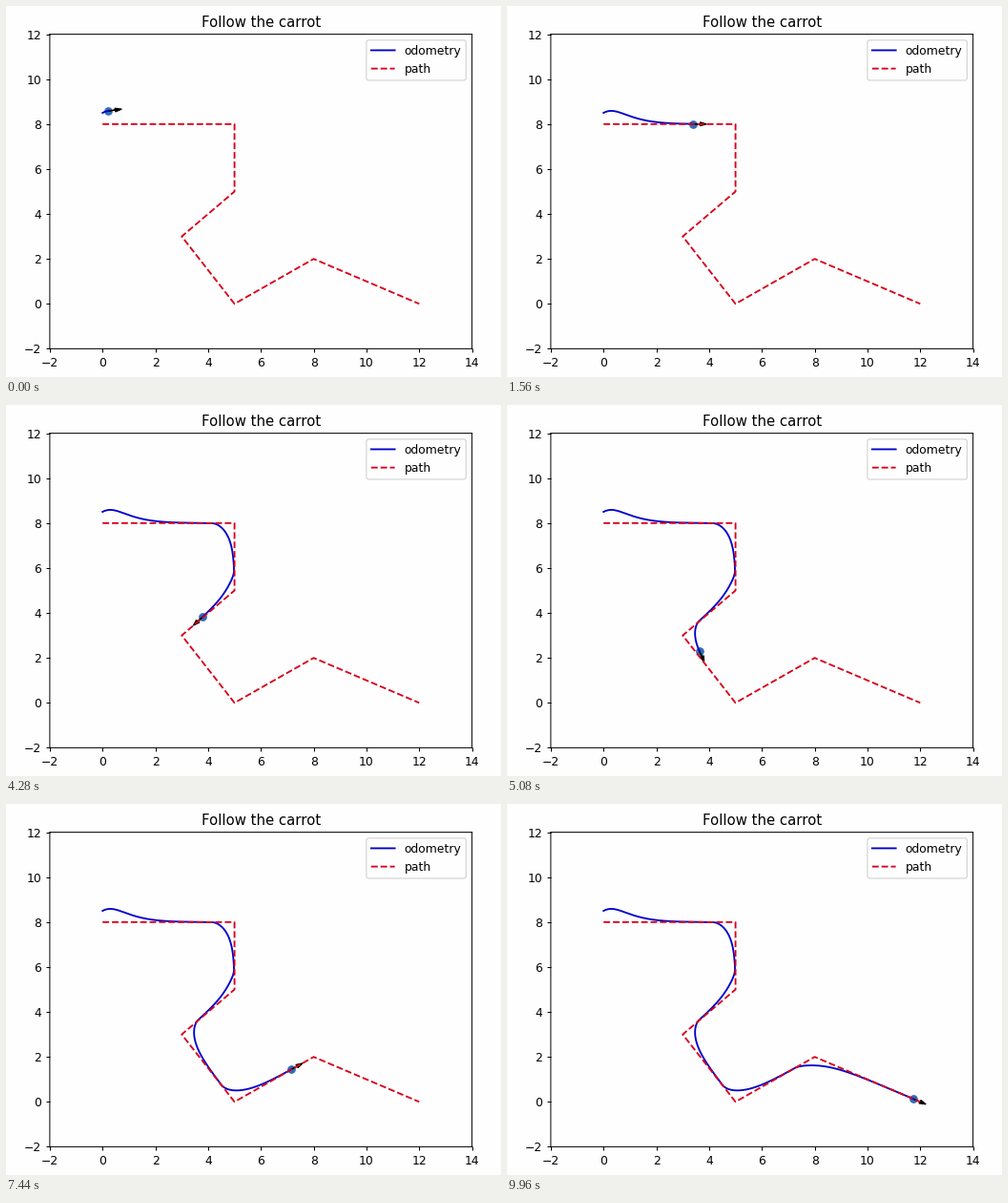
A matplotlib script for the animation above (10000 ms loop, 519 by 389 pixels).

```python
import math
import numpy as np
import matplotlib.pyplot as plt
from matplotlib.animation import FuncAnimation

W, H, DPI = 519, 389, 89.3
FRAMES, INTERVAL = 250, 40
LEFT, RIGHT, TOP, BOTTOM = 45.9, 488.6, 29.6, 359.4
BLUE, RED, DISC, PAPER = "#0000cc", "#d9001b", "#2f6dbb", "#fefefe"

PATH = np.array([(0, 8), (5, 8), (5, 5), (3, 3), (5, 0), (8, 2), (12, 0)],
                float)
LOOKAHEAD = 1.0     # carrot distance along the path
REACH = 0.92        # distance to a corner at which the next leg is taken
GOAL = 0.29         # distance to the last point at which the run ends
GAIN, MAX_TURN = 3.7, 1.9   # steering, radians per unit travelled
DS = 0.01
HEAD_START = 0.23   # distance already travelled at the first frame
SLOWDOWN = 0.038


def carrot(pos, start, end):
    leg = end - start
    size = math.hypot(*leg)
    along = max(0, (pos - start) @ leg / size)
    return start + leg * min(along + LOOKAHEAD, size) / size


def drive():
    """Steer towards the carrot; return positions and headings every DS."""
    pos, heading, leg = np.array([0, 8.5]), 0.6, 0
    last = len(PATH) - 2
    spots, headings = [pos], [heading]
    while math.dist(pos, PATH[-1]) > GOAL and len(spots) < 4000:
        if leg < last and math.dist(pos, PATH[leg + 1]) < REACH:
            leg += 1
        dx, dy = carrot(pos, PATH[leg], PATH[leg + 1]) - pos
        error = (math.atan2(dy, dx) - heading + math.pi) % math.tau - math.pi
        heading += DS * max(-MAX_TURN, min(MAX_TURN, GAIN * error))
        pos = pos + DS * np.array([math.cos(heading), math.sin(heading)])
        spots.append(pos)
        headings.append(heading)
    return np.array(spots), headings


track, headings = drive()

plt.rcParams["path.snap"] = False
fig = plt.figure(figsize=((W + 1e-6) / DPI, (H + 1e-6) / DPI), dpi=DPI,
                 facecolor=PAPER)
ax = fig.add_axes([LEFT / W, 1 - BOTTOM / H,
                   (RIGHT - LEFT) / W, (BOTTOM - TOP) / H], facecolor=PAPER)
ax.set_title("Follow the carrot")

trail, = ax.plot([], [], "-", color=BLUE, label="odometry")
ax.plot(*PATH.T, "--", color=RED, label="path")
robot, = ax.plot([], [], "o", color=DISC, ms=6, zorder=1)
arrow = ax.arrow(0, 0, 1, 0, head_width=.16, head_length=.25,
                 fc="k", ec="k", zorder=1.1)
ax.legend(loc="upper right", facecolor=PAPER)

ax.set(xlim=(-2, 14), ylim=(-2, 12),
       xticks=range(-2, 15, 2), yticks=range(-2, 13, 2))


def draw(step):
    n = step / (FRAMES - 1)
    n += SLOWDOWN * n * (1 - n)
    first, final = round(HEAD_START / DS), len(track) - 1
    i = round(first + (final - first) * n)

    x, y = track[i]
    trail.set_data(*track[:i + 1].T)
    robot.set_data([x], [y])
    arrow.set_data(x=x, y=y, dx=.27 * math.cos(headings[i]),
                   dy=.27 * math.sin(headings[i]))
    return trail, robot, arrow


anim = FuncAnimation(fig, draw, frames=FRAMES, interval=INTERVAL,
                     repeat=True, repeat_delay=0)
plt.show()
```
